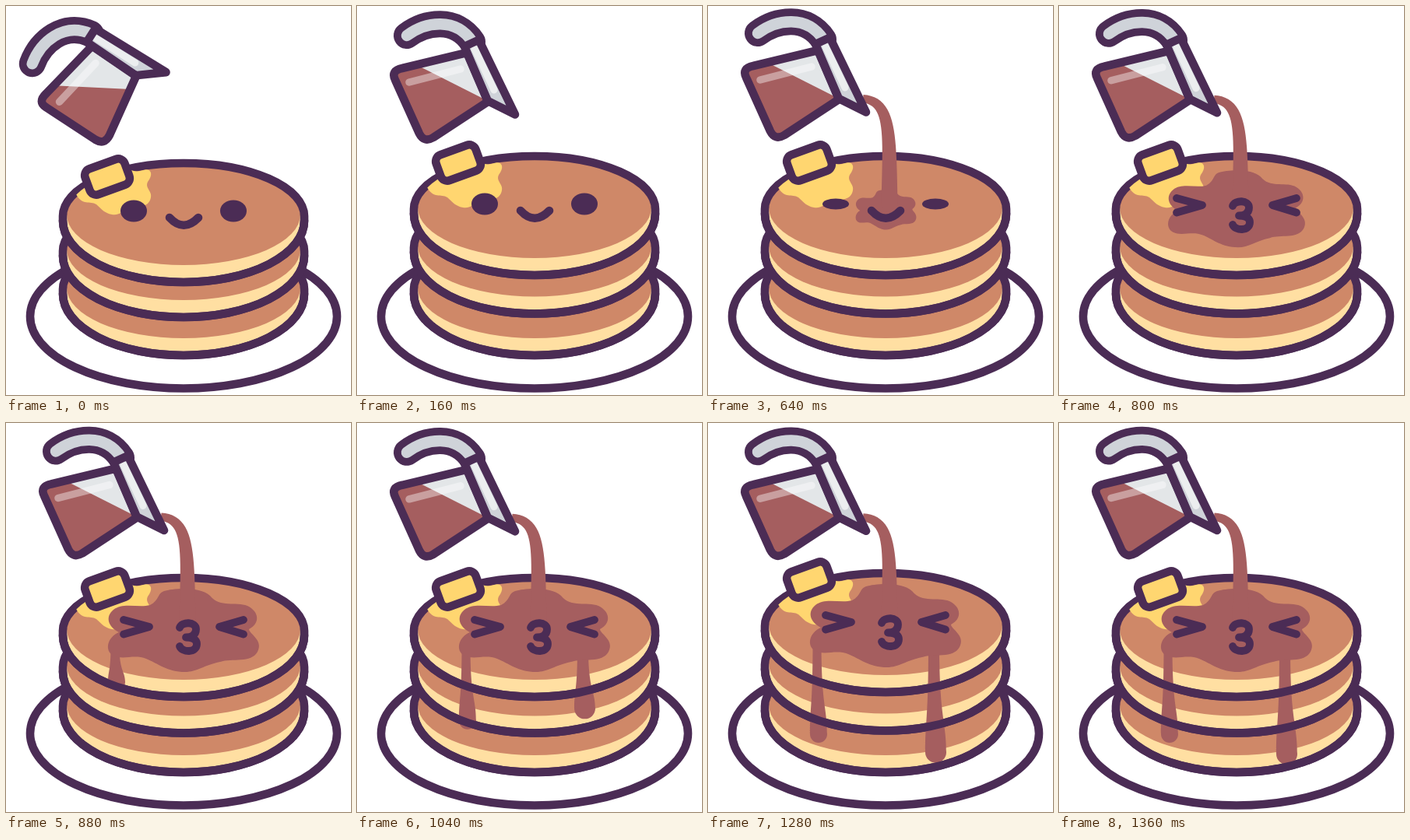
These frames come from a looping animation (443x500 px, 1.44 s). An HTML page:

```html
<!DOCTYPE html>
<html lang="en">
<head>
<meta charset="utf-8">
<title>Pancakes and syrup</title>
<style>
  html, body { margin: 0; width: 100%; height: 100%; overflow: hidden; background: #fff; }
  svg { display: block; width: 100vw; height: 100vh; }
  .line { fill: none; stroke: #4b2c55; stroke-width: 10.6; stroke-linecap: round; stroke-linejoin: round; }
  .syrup { fill: #a55e5f; }
  .butter { fill: #ffd670; }
  .ink { fill: #4b2c55; }
</style>
</head>
<body>
<svg viewBox="0 0 443 500">
  <defs>
    <path id="edge" d="M73 270 a155 68 0 0 1 310 0 v6 a155 79 0 0 1 -310 0 z"/>
    <path id="rim" class="line" d="M73 276 a155 79 0 0 0 310 0"/>
    <g id="cake">
      <use href="#edge" fill="#ffdfa2"/>
      <ellipse cx="228" cy="268" rx="150" ry="65" fill="#cf8868"/>
      <use href="#edge" class="line"/>
    </g>
    <path id="glass" d="M141 60 L58 80 Q43 83 49 95 L80 164 Q86 176 98 169 L168 123 Z"/>
    <path id="collar" d="M138 52 L156.5 43.5 L203 139.5 L168 122 Z"/>
    <path id="handle" d="M64 38 C88 20 127 14 148 46"/>
    <clipPath id="face"><ellipse cx="228" cy="268" rx="150" ry="65"/></clipPath>
    <clipPath id="inside"><use href="#glass"/></clipPath>
  </defs>

  <ellipse class="line" cx="228" cy="399" rx="197" ry="92.5" style="fill:#fff"/>

  <use href="#cake" y="94"/>
  <use href="#cake" class="mid"/>
  <g class="top">
    <use href="#cake"/>
    <path class="butter" clip-path="url(#face)" d="M90 242 C98 257 108 250 116 255 C124 262 126 266 136 268
      C146 270 150 262 160 260 C172 258 184 258 186 246 C188 238 178 234 182 226
      C190 216 186 208 176 211 C168 214 160 212 150 206 L96 215 Z"/>
  </g>

  <path id="dripL" class="syrup"/>
  <path id="dripR" class="syrup"/>
  <use href="#rim" y="94"/>
  <use href="#rim" class="mid"/>
  <use href="#rim" class="top"/>

  <g class="top">
    <path id="pool" class="syrup" d="M203 219 C215 215 250 213 262 225 C275 241 295 232 310 238
      C326 246 326 261 312 268 C312 274 331 282 323 297 C315 312 290 305 275 310
      C255 314 245 323 230 323 C207 323 195 312 180 306 C165 300 150 308 138 302
      C126 296 130 278 145 272 C131 265 127 252 138 243 C150 233 170 241 185 237
      C197 231 194 222 203 219 Z"/>
  </g>
  <path id="stream" class="syrup"/>

  <g class="top">
    <g id="smile">
      <ellipse class="ink eye" cx="164" cy="263.5" rx="17"/>
      <ellipse class="ink eye" cx="292" cy="263.5" rx="17"/>
      <path class="line" d="M210 272 Q228 291.5 247 272"/>
    </g>
    <g id="kiss" class="line" style="stroke-width:9.8">
      <path d="M151 256 L184 265 L151 274.5 M305 256 L274 265 L305 274.5"/>
      <path d="M223 266 C226 258 244 258 244 268 C244 276 238 278.5 231 278.5
        C241 278.5 245 282 245 287 C245 299 226 298 223 290"/>
    </g>
  </g>

  <rect id="pat" class="line" x="103" y="202" width="54" height="35" rx="9" style="fill:#ffd670"/>

  <g id="jug">
    <use href="#handle" class="line" style="stroke-width:34"/>
    <use href="#handle" fill="none" stroke="#cfd3d9" stroke-width="14.5" stroke-linecap="round"/>
    <use href="#glass" fill="#e3e6e8"/>
    <path id="fill" class="syrup" clip-path="url(#inside)"/>
    <path d="M67 98 L133 81" stroke="#fff" stroke-opacity=".4" stroke-width="9.5" stroke-linecap="round"/>
    <use href="#glass" class="line"/>
    <use href="#collar" fill="#cfd3d9"/>
    <path d="M151 55 L176 108" stroke="#eceeef" stroke-width="9" stroke-linecap="round"/>
    <use href="#collar" class="line"/>
  </g>
</svg>
<script>
const STEP = 80, STEPS = 18;
const $ = id => document.getElementById(id);
const all = (sel, fn) => document.querySelectorAll(sel).forEach(fn);
const set = (el, name, value) => el.setAttribute(name, value);
const clamp = v => Math.max(0, Math.min(1, v));
const mix = (a, b, t) => a + (b - a) * t;
const smooth = t => t * t * (3 - 2 * t);
const easeOut = t => 1 - (1 - t) ** 3;
const show = (el, on) => set(el, 'visibility', on ? 'visible' : 'hidden');

// Tapered drop: x range at the top, bulb centre and radius, lowest point
function drip(el, x1, x2, top, cx, r, end, on) {
  show(el, on);
  const y = end - r, m = mix(top, y, .7);
  set(el, 'd', `M${x1} ${top} C${x1} ${m} ${cx - r} ${m} ${cx - r} ${y}
    a${r} ${r} 0 0 0 ${2 * r} 0 C${cx + r} ${m} ${x2} ${m} ${x2} ${top} Z`);
}

// Syrup falling along a cubic, widening downwards, with a round tip
function pour(reach, bob) {
  const el = $('stream'), p = [[199, 122 + bob], [236, 126 + bob], [233, 165], [233, 255]];
  show(el, reach > 0);
  const left = [], right = [], N = 24;
  for (let i = 0; i <= N; i++) {
    const u = reach * i / N, v = 1 - u;
    const at = k => v ** 3 * p[0][k] + 3 * v * v * u * p[1][k] + 3 * v * u * u * p[2][k] + u ** 3 * p[3][k];
    const slope = k => v * v * (p[1][k] - p[0][k]) + 2 * v * u * (p[2][k] - p[1][k]) + u * u * (p[3][k] - p[2][k]);
    const dx = slope(0), dy = slope(1), w = (5 + 5.5 * u) / Math.hypot(dx, dy);
    left.push([at(0) - dy * w, at(1) + dx * w]);
    right.unshift([at(0) + dy * w, at(1) - dx * w]);
  }
  const r = 5 + 5.5 * reach;
  set(el, 'd', `M${left.join('L')}A${r} ${r} 0 0 0 ${right.join('L')}Z`);
}

function draw(ms) {
  const n = Math.floor(ms / STEP) % STEPS;

  // Stack bounces three times per loop; each layer up moves more
  const lift = 6 * Math.cos(n * Math.PI / 3) - 6;
  all('.top', el => set(el, 'transform', `translate(0 ${lift})`));
  all('.mid', el => set(el, 'transform', `translate(0 ${45 + lift / 2})`));
  set($('pat'), 'transform', `translate(0 ${2 * lift}) rotate(-20 130 219.5)`);

  // Jug tips over, then bobs gently
  const tilt = clamp(1 - n / 2);
  const bob = n < 2 ? 0 : 1.5 * Math.cos((n - 2) * Math.PI / 6) - 1.5;
  set($('jug'), 'transform', `translate(0 ${bob}) rotate(${-32.5 * tilt} 111 108)`);
  set($('fill'), 'd', `M${mix(75, 73, tilt)} ${mix(75, 77, tilt)}
    L${mix(165, 153, tilt)} ${mix(120.5, 133.5, tilt)} L100 190 L30 100 L40 70 Z`);

  pour(clamp((n - 2) / 3.75), bob);

  const s = smooth(clamp((n - 5.7) / 5.3));
  show($('pool'), n > 5);
  set($('pool'), 'transform', `translate(229 272) scale(${s} ${s ** .8}) translate(-229 -272)`);

  const yL = mix(300, 411, easeOut(clamp((n - 10) / 6.5)));
  const yR = mix(300, 439, easeOut(clamp((n - 11.5) / 6)));
  drip($('dripL'), 134.5, 145.5, 290 + lift, 142, 11, yL, n > 10);
  drip($('dripR'), 283, 297, 293 + lift, 292.5, 13.5, yR, n > 11);

  const squint = n > 8;
  show($('smile'), !squint);
  show($('kiss'), squint);
  all('.eye', el => set(el, 'ry', 14 - 7 * clamp((n - 6) / 2)));
}

function tick(now) {
  draw(now);
  requestAnimationFrame(tick);
}
draw(0);
requestAnimationFrame(tick);
</script>
</body>
</html>
```
